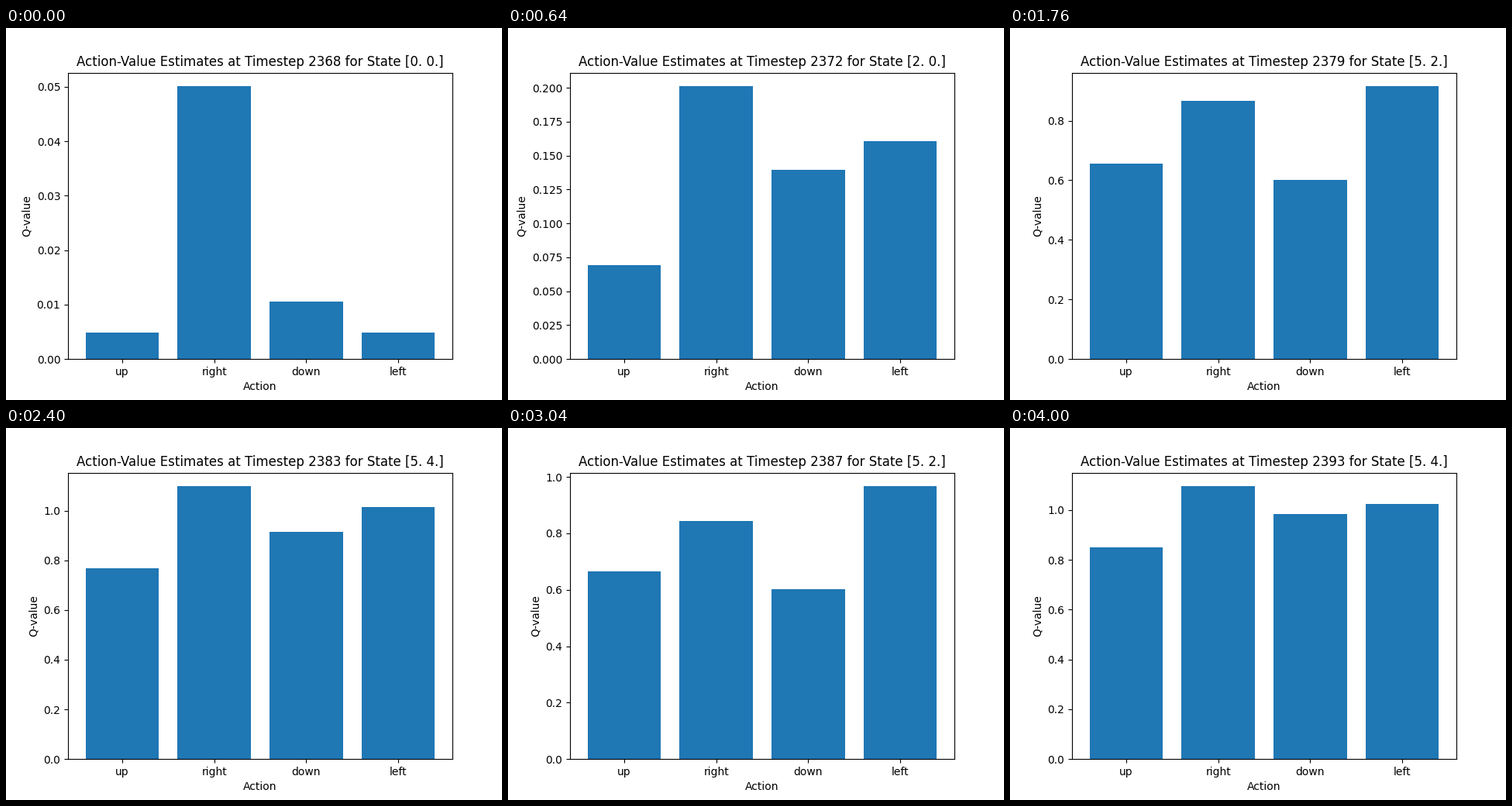
Write a matplotlib script that moves like this. It is 640x480 px and loops after 4160 ms.

```python
import numpy as np
import matplotlib.pyplot as plt
from matplotlib.animation import FuncAnimation

ACTIONS = ["up", "right", "down", "left"]
FIRST_STEP = 2368
FRAMES = 26
INTERVAL = 160

# Key points of the walk: (frame, cell, action values)
KEYS = [
    (0, (0, 0), (0.0049, 0.0501, 0.01055, 0.0049)),
    (4, (2, 0), (0.0692, 0.2011, 0.1396, 0.1607)),
    (8, (5, 0), (0.3494, 0.5258, 0.4702, 0.6746)),
    (11, (5, 2), (0.6557, 0.8663, 0.601, 0.9152)),
    (15, (5, 4), (0.7677, 1.0976, 0.9143, 1.014)),
    (19, (5, 2), (0.6654, 0.844, 0.602, 0.967)),
    (25, (5, 4), (0.8506, 1.0957, 0.9845, 1.025)),
]


def state_at(i):
    """Walk cell by cell between key points; values grow geometrically."""
    (t0, c0, q0), (t1, c1, q1) = next(
        pair for pair in zip(KEYS, KEYS[1:]) if i <= pair[1][0])
    c0, c1, q0, q1 = map(np.array, (c0, c1, q0, q1))
    cell = np.round(c0 + (c1 - c0) * (i - t0) / (t1 - t0))
    progress = np.abs(cell - c0).sum() / np.abs(c1 - c0).sum()
    return cell, q0 * (q1 / q0) ** progress


fig, ax = plt.subplots(figsize=(6.4, 4.8), dpi=100)


def draw(i):
    cell, values = state_at(i)
    ax.clear()
    ax.bar(ACTIONS, values, color="#1f77b4")
    ax.set_xlabel("Action")
    ax.set_ylabel("Q-value")
    ax.set_title(f"Action-Value Estimates at Timestep {FIRST_STEP + i} "
                 f"for State {cell}")
    return []


anim = FuncAnimation(fig, draw, frames=FRAMES, interval=INTERVAL,
                     init_func=lambda: draw(0), repeat=True, repeat_delay=0)
plt.show()
```
